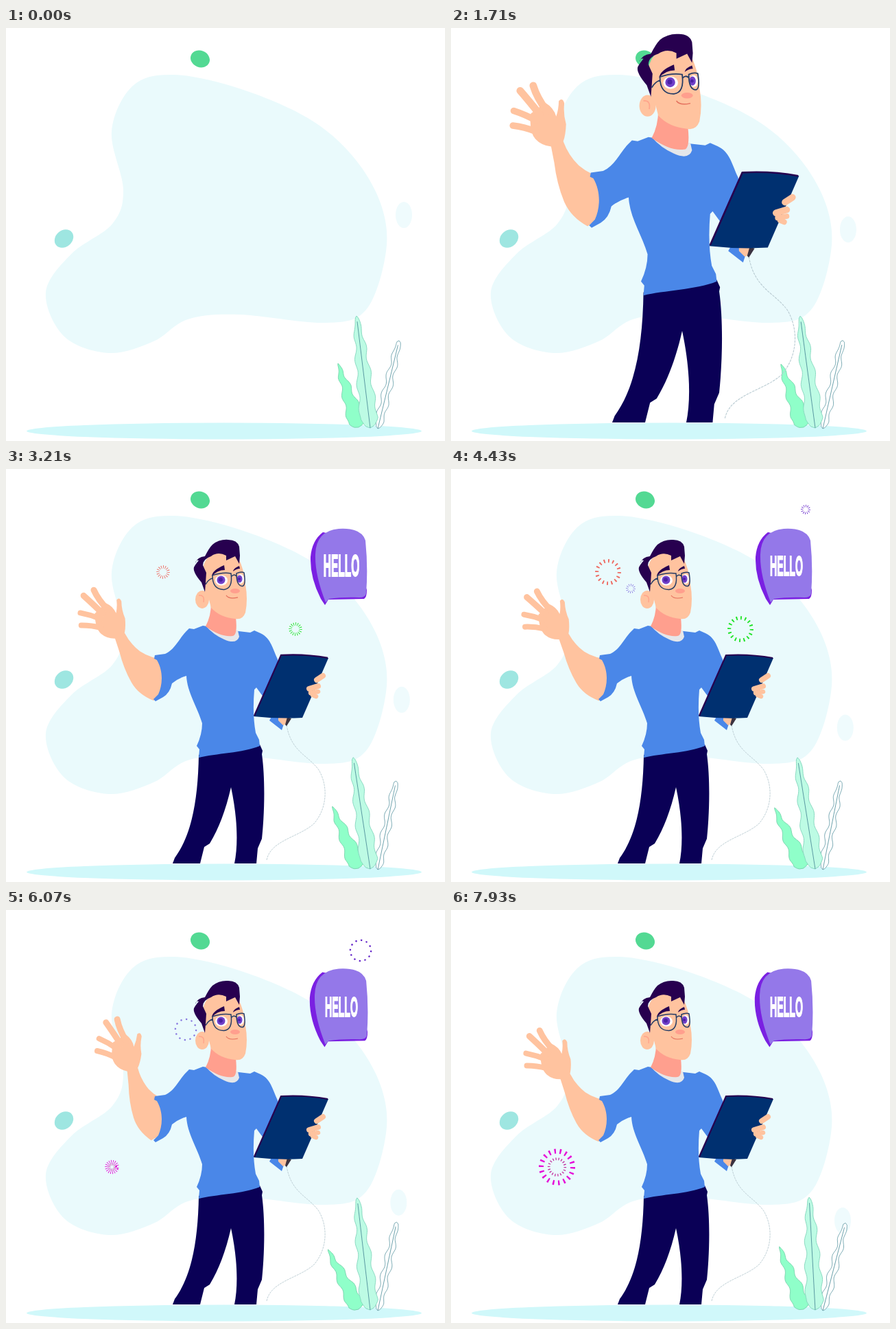
These frames come from a looping animation (640 px wide and 601 px high, 8000 ms). An HTML page:

```html
<!DOCTYPE html>
<html lang="en">
<head>
<meta charset="utf-8">
<title>Hello</title>
<style>
  html, body { margin: 0; width: 100%; height: 100%; overflow: hidden; background: #fff; }
  svg { display: block; width: 100%; height: 100%; }
  .skin { fill: #ffc39f; }
  .fingers { fill: none; stroke: #ffc39f; stroke-linecap: round; }
  .hair { fill: #27004f; }
  .shirt { fill: #4a87e8; }
  .pants { fill: #0a0056; }
  .blush { fill: #ff9f8e; }
  .glasses { fill: none; stroke: #243c66; stroke-width: 1.5; }
  .cable { fill: none; stroke: #b9cbd2; stroke-width: .9; stroke-dasharray: 3 1; }
  text { font: bold 41px "Liberation Sans", Arial, sans-serif; }
</style>
</head>
<body>
<svg viewBox="0 0 640 601" preserveAspectRatio="none">
  <path id="cloud" fill="#eafafc"/>
  <ellipse transform="translate(283 45) rotate(22)" rx="14.3" ry="12" fill="#53d993"/>
  <ellipse transform="translate(84.5 306.5) rotate(-40)" rx="14.8" ry="12" fill="#9ee6e1"/>
  <ellipse id="drop" rx="12" ry="19" fill="#effbfd"/>
  <ellipse cx="318" cy="586.5" rx="288" ry="12" fill="#d0f8fa"/>
  <g id="leaves"></g>

  <g id="man">
    <path class="cable" d="M409 373C416 412 440 416 456 438C470 462 468 494 449 516C427 536 386 540 380 569"/>
    <g id="arm">
      <path class="skin" d="M131 209L147 194Q158 199 162 209Q164 200 163 190Q167 185 170 192Q170 205 175 217Q176 230 174 238Q182 254 196 265Q212 276 236 278L236 318L215 337Q193 328 183 310Q172 290 166 265L160 246Q148 246 140 239Q131 231 131 209Z"/>
      <path class="fingers" stroke-width="9" d="M130 175Q136 189 150 204M115 183Q127 194 142 209"/>
      <path class="fingers" stroke-width="8" d="M110 208Q125 211 139 217M111 226Q125 226 140 230"/>
    </g>

    <path class="pants" d="M281 416L370 401L374 410L373 415C378 450 377 500 373 538L367 552L365 574H333C339 545 337 505 328 463C321 494 311 522 297 545L289 550L283 574H243L246 566C271 532 280 480 281 416Z"/>
    <path class="shirt" d="M287 228L274 233L267 232L262 237C253 246 246 263 232 269L217 271L216 276L220 278C230 295 228 315 222 328L215 335L218 338L229 332Q239 326 242 312Q250 305 263 301C264 325 279 346 286 370Q286 386 278 403L282 408L281 420C305 414 346 413 370 403L369 394L364 384Q359 357 362 321L365 318L379 337L400 300L396 277C388 260 386 246 371 239L362 235L356 238L339 236Z"/>
    <path class="shirt" d="M384 366L402 380L408 362L390 355Z"/>

    <path fill="#e5e7ea" d="M291 228Q302 241 318 248Q336 256 340 244L338 235Z"/>
    <path class="blush" d="M299 195Q299 214 291 229Q313 245 330 243Q338 243 335 216Z"/>
    <ellipse class="skin" cx="286" cy="190" rx="10" ry="13"/>
    <path d="M281 184Q290 183 288 194" fill="none" stroke="#ffa58c" stroke-width="1.5"/>
    <path class="skin" d="M287 145Q291 121 315 123L338 128Q347 145 349 168Q353 190 349 209Q345 220 334 218Q312 216 299 202L296 190L290 178Z"/>
    <path class="hair" d="M290 179L285 165Q272 150 274 143Q276 139 281 133Q277 132 276 137Q279 128 290 127Q296 115 301 110Q311 102 324 103Q337 103 340 113L341 126L340 138L334 127L321 133L321 126Q309 120 299 127Q287 131 287 140L292 151L291 166Z"/>

    <ellipse cx="314" cy="162" rx="9" ry="7.5" fill="#fff"/>
    <ellipse cx="342" cy="160" rx="5" ry="7" fill="#fff"/>
    <g fill="#7140c9"><circle cx="313.5" cy="161.5" r="6"/><ellipse cx="340.5" cy="160" rx="4" ry="5.5"/></g>
    <g fill="#4a22a4"><circle cx="313" cy="161" r="3"/><circle cx="340" cy="160" r="2"/></g>
    <path class="hair" d="M300 156Q301 147 318 140L319 147Q308 147 300 156ZM331 149Q332 144 340 141L341 145Q336 145 331 149Z"/>
    <path class="glasses" d="M301 155Q315 150 328 152Q331 174 318 175.500Q301 176 301 155ZM336 152Q343 149 347 151Q350 169 345 170.500Q336 171 336 152ZM328 157Q332 152 336 156M301 159Q295 161 291 168"/>
    <ellipse class="blush" cx="334" cy="177.500" rx="7" ry="3.500"/>
    <path d="M321 184Q325 190 338 187" fill="none" stroke="#e4705d" stroke-width="1.2"/>

    <path class="skin" d="M397 361H414Q413 370 404 373L397 366Z"/>
    <path fill="#3a3240" d="M410 361L416 363L409 374L407 372Z"/>
    <path fill="#003070" d="M401 271Q436 269 470 275L432 362Q397 364 361 360Z"/>
    <path fill="none" stroke="#27004f" stroke-width="2.2" d="M469 275Q436 269 401 271L362 359"/>
    <path class="fingers" stroke-width="8" d="M462 301L453 307M455 316L442 320"/>
    <path class="fingers" stroke-width="6.5" d="M455 324L444 326M452 331L447 329"/>
  </g>

  <g id="bubble">
    <path fill="#7a20e2" d="M462 92Q446 104 444 128Q443 158 459 189L465 198L470 190L522 189Q526 187 526 176L500 100Z"/>
    <path fill="#9478e9" d="M485 87Q518 85 524 104Q528 144 525 181Q524 187 515 187Q490 186 471 189L466 194Q450 154 451 124Q452 90 485 87Z"/>
  </g>
  <g id="word">
    <text transform="translate(489 155) scale(.345 1)" text-anchor="middle" fill="#fff" stroke="#fff" stroke-width="2">HELLO</text>
  </g>
  <g id="bursts" fill="none"></g>
</svg>

<script>
const LOOP = 8000;
const $ = id => document.getElementById(id);

function add(parent, tag, attrs) {
  const el = document.createElementNS('http://www.w3.org/2000/svg', tag);
  for (const name in attrs) el.setAttribute(name, attrs[name]);
  return parent.appendChild(el);
}

// Progress through [from, to], linear and eased.
const ramp = (t, from, to) => Math.min(1, Math.max(0, (t - from) / (to - from)));
const smooth = (...span) => { const p = ramp(...span); return p * p * (3 - 2 * p); };
const snap = (...span) => { const p = ramp(...span); return p < .5 ? 8 * p ** 4 : 1 - 8 * (1 - p) ** 4; };
const mix = (a, b, p) => a + (b - a) * p;

// Closed smooth curve through "x,y x,y ..." points.
function curve(text) {
  const pts = text.split(' ').map(p => p.split(',').map(Number));
  const at = i => pts[(i + pts.length) % pts.length];
  const handle = (i, side) => at(i).map((v, k) => v + side * (at(i + 1)[k] - at(i - 1)[k]) / 6);
  return 'M' + at(0) + pts.map((p, i) => `C${handle(i, 1)} ${handle(i + 1, -1)} ${at(i + 1)}`).join('') + 'Z';
}

$('cloud').setAttribute('d', curve(
  '245,68 340,88 440,131 505,186 546,255 554,325 525,410 465,429 340,417 265,424 215,456 150,473 85,449 58,385 95,329 155,285 171,235 154,150 185,84'));

// Wavy leaf: a straight spine with a rippling edge, narrowing to the tip.
function leaf(base, tip, width, taper, waves, fill, stroke, vein) {
  const [dx, dy] = [tip[0] - base[0], tip[1] - base[1]];
  const length = Math.hypot(dx, dy);
  const point = (u, side) => {
    const half = width * Math.min(1, Math.sqrt(u * 12)) * (1 - u) ** taper;
    const ripple = 1.8 * Math.sin(u * waves * 2 * Math.PI) * Math.min(1, 5 * (1 - u), 5 * u);
    const off = side * half + ripple;
    return [base[0] + dx * u - dy / length * off, base[1] + dy * u + dx / length * off].map(v => v.toFixed(1));
  };
  const steps = Array.from({ length: 61 }, (_, i) => i / 60);
  const edge = [...steps.map(u => point(u, -1)), ...steps.reverse().map(u => point(u, 1))];
  const group = add($('leaves'), 'g', {});
  add(group, 'path', { d: 'M' + edge.join('L') + 'Z', fill, stroke, 'stroke-width': .9 });
  if (vein) add(group, 'path', { d: `M${base}L${base[0] + dx * .95} ${base[1] + dy * .95}`, stroke: vein });
  return angle => group.setAttribute('transform', `rotate(${angle} ${base})`);
}

const rightLeaf = leaf([542, 583], [573, 455], 6, .2, 4.5, '#fff', '#6fa3ad', '#6fa3ad');
const leftLeaf = leaf([514, 581], [484, 488], 13, .7, 3.5, '#8fffc9', '#78d3ac');
const midLeaf = leaf([531, 582], [511, 419], 13, .45, 4.5, '#bdfbe4', '#83d6bd', '#5b9aa2');

// Rays are the dashes of a ring that pops open, widens and thins out.
function burst(cx, cy, count, stroke, start, life, size) {
  const el = add($('bursts'), 'circle',
    { cx, cy, stroke, pathLength: count * 10, 'stroke-dasharray': '3 7' });
  return t => {
    const p = ramp(t, start, start + life);
    const outer = size * mix(.25, 1, p);
    const inner = size * (p < .6 ? mix(.1, .45, p / .6) : mix(.45, 1, (p - .6) / .4));
    el.setAttribute('r', (inner + outer) / 2);
    el.setAttribute('stroke-width', p > 0 ? outer - inner : 0);
  };
}

const bursts = [
  burst(229, 150, 16, '#ee6a62', 2750, 2500, 25),
  burst(422, 233, 16, '#22e32a', 2750, 2500, 25),
  burst(517, 59, 12, '#6526c9', 4050, 2500, 19),
  burst(262, 174, 12, '#8a7ce0', 4050, 2500, 19),
  burst(154.5, 374, 18, '#e60fd8', 5900, 3000, 35),
  burst(154.5, 374, 18, '#c02a9c', 5900, 3000, 18),
];

function grow(id, x, y, s) {
  $(id).setAttribute('transform', `translate(${x} ${y}) scale(${s}) translate(${-x} ${-y})`);
}

function draw(t) {
  grow('man', 283, 574, 1.2 * snap(t, 120, 1710) - .2 * snap(t, 1710, 3400));
  grow('bubble', 485, 144, smooth(t, 2450, 3150) + .028 * smooth(t, 4430, 5300));
  grow('word', 489, 141, 1.1 * smooth(t, 2550, 3150) - .1 * smooth(t, 3210, 3800));

  const wave = 6.5 - 9.5 * smooth(t, 1710, 3900) + 15 * snap(t, 3900, 5600) - 12.3 * smooth(t, 6070, 7930);
  $('arm').setAttribute('transform', `rotate(${wave} 222 320)`);

  leftLeaf(6 * smooth(t, 6000, LOOP) - 9.3 * smooth(t, 0, 6000));
  midLeaf(6 * smooth(t, 4600, LOOP) - 2.1 * smooth(t, 0, 4430));
  rightLeaf(3.3 * smooth(t, 5200, LOOP) - 2.3 * smooth(t, 0, 4430));

  const fall = smooth(t, 0, LOOP);
  $('drop').setAttribute('transform', `translate(${580 - 9 * fall} ${272 + 180 * fall})`);
  bursts.forEach(update => update(t));
}

const begin = performance.now();
function tick() {
  draw((performance.now() - begin) % LOOP);
  requestAnimationFrame(tick);
}
tick();
</script>
</body>
</html>
```
